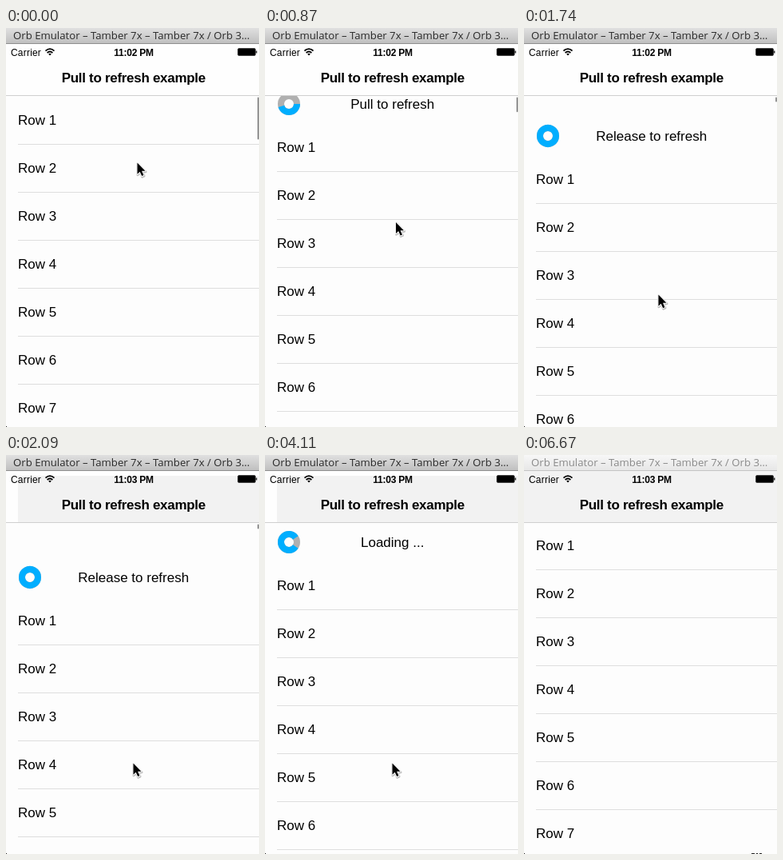
An HTML page for the animation above (6780 ms loop, 317 by 499 pixels).

```html
<!DOCTYPE html>
<html lang="en">
<head>
<meta charset="utf-8">
<title>Pull to refresh example</title>
<style>
  html, body { margin: 0; width: 100%; height: 100%; overflow: hidden; background: #fff; }
  svg { display: block; width: 317px; height: 499px; }
  text { font: 17px "Liberation Sans", Arial, sans-serif; fill: #000; }
  .caption { font: 13.2px "Open Sans", "Noto Sans", sans-serif; }
  .title { font-weight: bold; letter-spacing: -.3px; }
  .carrier { font-size: 12px; letter-spacing: .2px; }
  .clock { font-size: 12px; font-weight: bold; letter-spacing: -.25px; }
  .mid { text-anchor: middle; }
</style>
</head>
<body>
<svg viewBox="0 0 317 499" xmlns="http://www.w3.org/2000/svg">
  <defs>
    <linearGradient id="active" x2="0" y2="1">
      <stop stop-color="#e0e0e0"/><stop offset="1" stop-color="#bebebe"/>
    </linearGradient>
    <linearGradient id="inactive" x2="0" y2="1">
      <stop stop-color="#f7f7f7"/><stop offset="1" stop-color="#e6e6e6"/>
    </linearGradient>
  </defs>

  <rect width="317" height="499" fill="#fdfdfd"/>
  <g id="list">
    <g id="loader">
      <circle cx="30" cy="-25" r="10" fill="none" stroke="#b0b0b0" stroke-width="8"/>
      <path id="arc" fill="none" stroke="#00aeff" stroke-width="8"/>
      <text id="label" class="mid" x="159.7" y="-19"></text>
    </g>
  </g>
  <rect id="scrollbar" x="315" y="86.5" width="2" rx="1" fill="#949494"/>

  <rect y="20" width="317" height="64" fill="#fefefe"/>
  <rect id="tint" fill="#f2f2f2"/>
  <rect y="84" width="317" height="1" fill="#cfcfcf"/>
  <text class="title mid" x="159.8" y="68">Pull to refresh example</text>

  <text class="carrier" x="6" y="34.5">Carrier</text>
  <g fill="none" stroke="#000" stroke-width="1.7">
    <path d="M49.5 28.6Q55 23.6 60.5 28.6M51.6 31Q55 28 58.4 31"/>
    <path d="M55 34.5L53.2 32.5Q55 31.2 56.8 32.5Z" fill="#000" stroke="none"/>
  </g>
  <text id="clock" class="clock mid" x="160" y="34.5"></text>
  <rect x="290.5" y="25.5" width="22" height="9" rx="1.5" stroke="#444"/>
  <rect x="313" y="28.5" width="1.5" height="3" fill="#333"/>

  <rect id="bar" width="317" height="20"/>
  <rect id="barEdge" y="19" width="317" height="1"/>
  <text id="caption" class="caption" x="9" y="14">Orb Emulator – Tamber 7x – Tamber 7x / Orb 3…</text>

  <g id="cursor" stroke-linejoin="round">
    <use href="#arrow" x=".5" y="1" stroke="#000" stroke-width="3" opacity=".25"/>
    <use href="#arrow" stroke="#fff" stroke-width="2"/>
    <path id="arrow" d="M0 0V14.2L3.2 11.2L5.7 16.6L8 15.6L5.6 10.3H10Z"/>
  </g>
  <path id="specks" d="M285 498.5h4m2 0h2m2 0h3" stroke="#222"/>
  <rect y="498" width="1" height="1" fill="#222"/>
</svg>
<script>
const $ = id => document.getElementById(id);
const LOOP = 6780, TOP = 84, ROW = 60;
const RELEASE = 2620, SPIN = 2865, DONE = 4700, BLUR = 6670, TINT = 1910;

// Screen updates come in bursts: [first, last, count]
const bursts = [
  [270, 870, 8], [960, 1570, 8], [1650, 2090, 6], [2620, 3240, 8], [3320, 3930, 8],
  [4020, 4630, 8], [4720, 5140, 6], [5950, 6210, 4], [6670, 6670, 1]
];
const ticks = [0];
for (const [a, b, n] of bursts)
  for (let i = 0; i < n; i++)
    ticks.push(n > 1 ? Math.floor((a + (b - a) * i / (n - 1)) / 10) * 10 : a);

// Keys: [time, pull distance]
const pullKeys = [[180, 2], [530, 19], [1220, 54], [1740, 76], [2090, 94]];
// Keys: [time, x, y]
const cursorKeys = [
  [180, 164.5, 168.5], [530, 162.5, 201.5], [1220, 165.5, 285.5], [1740, 168.5, 334.5],
  [2090, 159.5, 385.5], [5860, 159.5, 385.5], [6210, 280, 520]
];

const clamp = v => Math.max(0, Math.min(1, v));
const smooth = u => u * u * (3 - 2 * u);

function track(keys, t, col) {
  let i = 1;
  while (i < keys.length - 1 && t > keys[i][0]) i++;
  const a = keys[i - 1], b = keys[i];
  return a[col] + (b[col] - a[col]) * clamp((t - a[0]) / (b[0] - a[0]));
}

function pullAt(t) {
  if (t < RELEASE) return track(pullKeys, t, 1);
  if (t < DONE) return 50 + 44 * (1 - smooth(clamp((t - 2570) / 300)));
  return 50 * (1 - smooth(clamp((t - 4640) / 460)));
}

// Part of the ring, both ends in turns, clockwise from the right
function ring(from, to) {
  const end = Math.min(to, from + .9999);
  const point = f => {
    const a = f * 2 * Math.PI;
    return (30 + 10 * Math.cos(a)).toFixed(3) + " " + (-25 + 10 * Math.sin(a)).toFixed(3);
  };
  return end <= from ? "" :
    `M${point(from)}A10 10 0 ${end - from > .5 ? 1 : 0} 1 ${point(end)}`;
}

function arcAt(t, pull) {
  if (t < RELEASE) return ring(0, clamp((pull - 9) / 60));
  if (t < SPIN || t >= DONE) return ring(0, 1);
  const u = (t - SPIN) / 500 % 2;
  const gap = .2 * (u < 1 ? u : 2 - u);
  return ring(gap, 1 - gap);
}

function set(id, attrs) {
  for (const k in attrs) $(id).setAttribute(k, attrs[k]);
}

for (let i = 0; i < 7; i++)
  $("list").insertAdjacentHTML("beforeend",
    `<text x="15" y="${i * ROW + 35}">Row ${i + 1}</text>
     <rect x="15" y="${i * ROW + 59}" width="302" height="1" fill="#dedede"/>`);

function draw(time) {
  const t = ticks.filter(v => v <= time).pop();
  const pull = pullAt(t), blurred = t >= BLUR;

  set("list", { transform: `translate(0 ${TOP + Math.round(pull)})` });
  set("arc", { d: arcAt(t, pull) });
  $("label").textContent = t >= RELEASE ? "Loading ..." :
    pull > 50 ? "Release to refresh" : "Pull to refresh";
  set("scrollbar", { height: Math.max(6, 55 - pull), opacity: t < 2800 ? 1 : 0 });

  set("tint", blurred ? { x: 0, y: 20, width: 317, height: 64 }
                      : { x: 15, y: 26, width: 302, height: 58 });
  set("tint", { opacity: t >= TINT ? 1 : 0 });
  $("clock").textContent = t >= TINT ? "11:03 PM" : "11:02 PM";

  set("bar", { fill: blurred ? "url(#inactive)" : "url(#active)" });
  set("barEdge", { fill: blurred ? "#c4c4c4" : "#8e8e8e" });
  $("caption").style.fill = blurred ? "#8a8a8a" : "#2a2a2a";
  set("specks", { opacity: blurred ? 1 : 0 });
  set("cursor", { transform: `translate(${track(cursorKeys, t, 1)} ${track(cursorKeys, t, 2)})` });
}

const start = performance.now();
function frame() {
  draw((performance.now() - start) % LOOP);
  requestAnimationFrame(frame);
}
frame();
</script>
</body>
</html>
```
